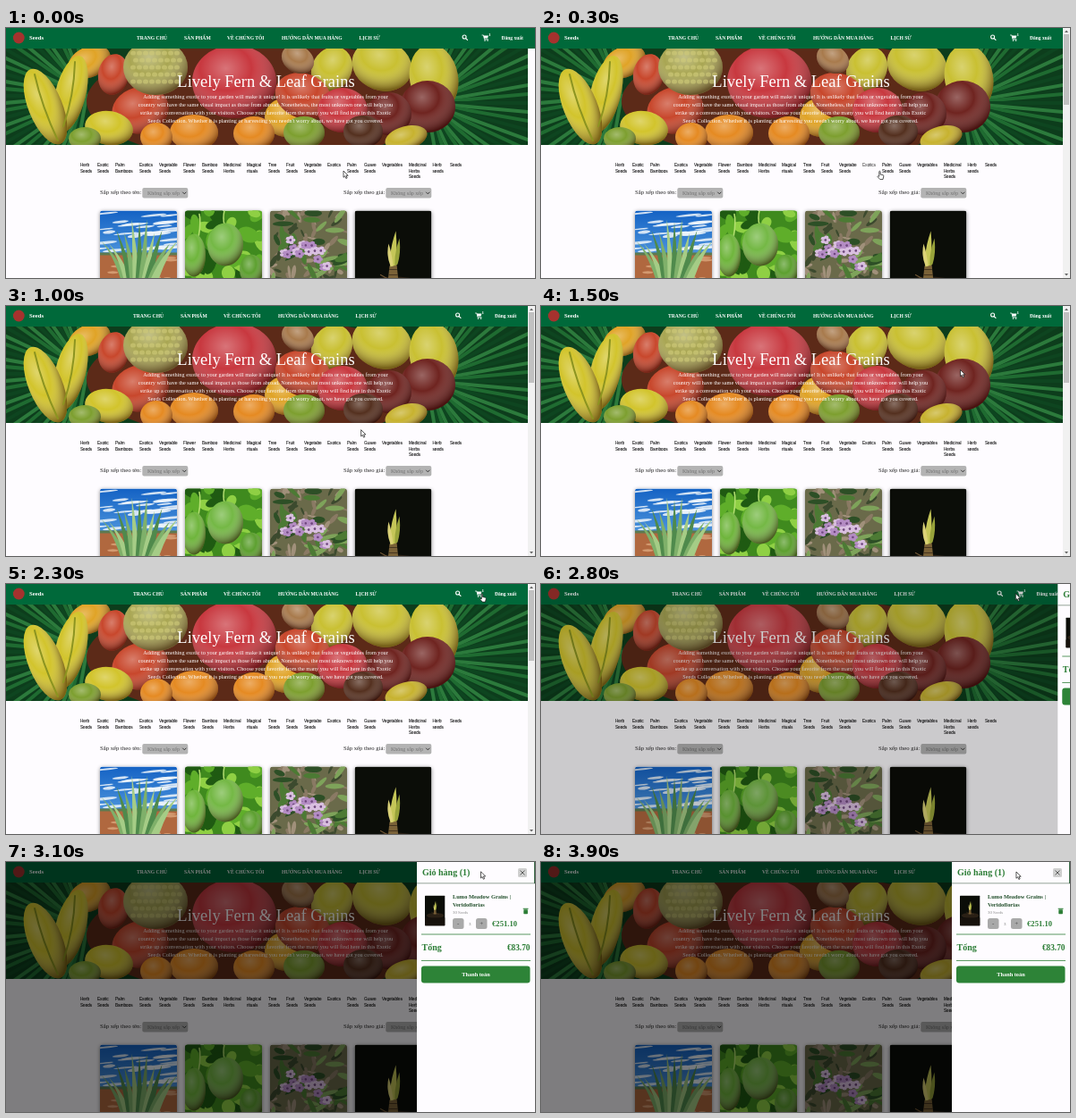
An HTML page for the animation above (4000 ms loop, 591x280 px).

```html
<!DOCTYPE html>
<html lang="vi">
<head>
<meta charset="utf-8">
<title>Seeds</title>
<style>
html, body { margin: 0; width: 100%; height: 100%; overflow: hidden; background: #fff; }
svg { display: block; width: 591px; height: 280px; }
text { font-family: "Liberation Serif", serif; white-space: pre; }
.sans { font-family: "Liberation Sans", Arial, sans-serif; stroke: currentColor; stroke-width: .1px; }
.bold { font-weight: bold; }
</style>
</head>
<body>
<svg id="stage" viewBox="0 0 591 280" xmlns="http://www.w3.org/2000/svg"></svg>
<script>
const LOOP = 4000, STEP = 100;
const GREEN = '#00693a', LEAF = '#2c7d36', PAGE = '#fefcff';

const rect = (x, y, w, h, fill, more = '') =>
  `<rect x="${x}" y="${y}" width="${w}" height="${h}" fill="${fill}" ${more}/>`;
const oval = (x, y, rx, ry, fill, turn = 0) =>
  `<ellipse cx="${x}" cy="${y}" rx="${rx}" ry="${ry}" fill="${fill}" transform="rotate(${turn} ${x} ${y})"/>`;
const path = (d, fill, more = '') => `<path d="${d}" fill="${fill}" ${more}/>`;
const line = (d, stroke, width = 1) =>
  path(d, 'none', `stroke="${stroke}" stroke-width="${width}" stroke-linecap="round"`);
const text = (x, y, size, str, fill = '#222', cls = '', more = '') =>
  `<text x="${x}" y="${y}" font-size="${size}" fill="${fill}" class="${cls}" ${more}>${str}</text>`;
const group = (id, body) => `<g id="${id}">${body}</g>`;
const middle = 'text-anchor="middle"';

let seed = 7;
const random = () => (seed = seed * 16807 % 2147483647) / 2147483647;
const between = (a, b) => a + (b - a) * random();
const repeat = (n, make) => Array.from({ length: n }, (_, i) => make(i)).join('');

const defs = `<defs>
  <radialGradient id="round" cx=".4" cy=".32" r=".68">
    <stop offset="0" stop-color="#fff" stop-opacity=".3"/>
    <stop offset=".45" stop-color="#fff" stop-opacity="0"/>
    <stop offset="1" stop-color="#200" stop-opacity=".5"/>
  </radialGradient>
  <linearGradient id="sky" x2="0" y2="1">
    <stop offset="0" stop-color="#1462c4"/><stop offset=".5" stop-color="#5fa4e4"/>
  </linearGradient>
  <filter id="shade" x="-10%" y="-10%" width="120%" height="120%">
    <feDropShadow dx="0" dy="1" stdDeviation="2" flood-opacity=".45"/>
  </filter>
  <clipPath id="hero"><rect y="23" width="583" height="108"/></clipPath>
  <clipPath id="frame"><rect width="86" height="130" rx="3"/></clipPath>
</defs>`;

// Palm leaflets fan out from a rib.
const palm = (x, y, side) => repeat(33, i => {
  const a = (-80 + i * 5) * Math.PI / 180;
  return line(`M${x} ${y}l${side * Math.cos(a) * 130} ${Math.sin(a) * 130}`,
    ['#1f6b31', '#0e4520', '#2c7a3c'][i % 3], 4);
});

// Back to front: colour, then centre, radii and turn of each fruit.
const fruits = [
  ['#c9c032', [[420, 42, 34, 28, 20], [478, 56, 27, 38, -10], [364, 46, 22, 26, 30]]],
  ['#e0a326', [[93, 38, 25, 17, -25], [313, 100, 24, 22, 0]]],
  ['#c8472c', [[120, 52, 17, 23, 10], [150, 92, 32, 26, -15], [332, 76, 32, 25, 20]]],
  ['#a9a653', [[167, 44, 36, 31, 0]]],
  ['#c8383f', [[255, 60, 47, 41, 0], [376, 92, 28, 25, 0]]],
  ['#a87a4c', [[326, 35, 19, 15, 30]]],
  ['#d2c42c', [[72, 74, 17, 44, 14], [44, 88, 19, 45, -22], [115, 112, 27, 19, 10]]],
  ['#6f2420', [[471, 88, 31, 29, 0], [428, 96, 25, 24, 0]]],
  ['#e58a22', [[210, 117, 27, 20, 0], [277, 118, 23, 19, 0], [168, 122, 18, 16, 0]]],
  ['#7d9f2f', [[333, 117, 23, 18, 0], [88, 124, 18, 13, 0]]],
  ['#54301f', [[399, 116, 22, 18, 0]]],
  ['#c7b22f', [[447, 123, 24, 13, -15]]],
];

const shaded = (x, y, rx, ry, fill, turn) =>
  oval(x, y, rx, ry, fill, turn) + oval(x, y, rx, ry, 'url(#round)', turn);

function hero() {
  const pile = fruits.map(([fill, spots]) =>
    spots.map(([x, y, rx, ry, turn]) => shaded(x, y, rx, ry, fill, turn)).join('')).join('');
  const scales = repeat(40, i => oval(142 + i % 8 * 7 + (i >> 3) % 2 * 3, 28 + (i >> 3) * 8, 3, 2.6, '#d0cb7a99'));
  const ridges = line('M32 52Q40 88 58 126M77 38Q76 76 64 110', '#8c9420', 2);
  const lines = [
    'Adding something exotic to your garden will make it unique! It is unlikely that fruits or vegetables from your',
    'country will have the same visual impact as those from abroad. Nonetheless, the most unknown one will help you',
    'strike up a conversation with your visitors. Choose your favorite from the many you will find here in this Exotic',
    "Seeds Collection. Whether it is planting or harvesting you needn't worry about, we have got you covered.",
  ];
  return `<g clip-path="url(#hero)">${rect(0, 23, 583, 108, '#0d3d1c')}
    ${palm(90, 76, -1)}${palm(470, 84, 1)}${oval(285, 82, 195, 68, '#5c2a18')}
    ${pile}${scales}${ridges}</g>
    ${text(290.5, 66, 18.5, 'Lively Fern &amp; Leaf Grains', '#fff', '', middle)}
    ${lines.map((s, i) => text(290, 79.2 + i * 8.8, 6.25, s, '#fff', '', middle)).join('')}`;
}

const magnifier = `<circle cx="504.6" cy="10" r="2" fill="none" stroke="#fff" stroke-width="1.1"/>` +
  line('M506.2 11.6l1.8 1.8', '#fff', 1.2);
const cart = line('M524.5 8h1.4l1.2 4.8h4', '#fff', .8) + path('M526 8.6h5.4l-.8 3h-4z', '#fff') +
  oval(527.5, 14, .8, .8, '#fff') + oval(530.6, 14, .8, .8, '#fff');

function header() {
  const nav = [[142, 'TRANG CHỦ'], [195, 'SẢN PHẨM'], [243, 'VỀ CHÚNG TÔI'],
    [304, 'HƯỚNG DẪN MUA HÀNG'], [390.5, 'LỊCH SỬ']];
  return rect(0, 0, 591, 23, GREEN) + oval(14.3, 11, 6.4, 6.4, '#a5322e') +
    text(26, 13.4, 6.7, 'Seeds', '#fff', 'bold') +
    group('nav', nav.map(([x, s]) => text(x, 13.2, 5.6, s, '#fff', 'bold')).join('')) +
    group('tools', magnifier + cart + text(531.6, 9.2, 5, '1', '#fff', 'bold') +
      text(546, 13.2, 5.5, 'Đăng xuất', '#fff', 'bold'));
}

const categories = [[83, 'Herb Seeds'], [102, 'Exotic Seeds'], [122, 'Palm Bamboos'],
  [149, 'Exotics Seeds'], [171, 'Vegetable Seeds'], [198, 'Flower Seeds'], [219, 'Bamboo Seeds'],
  [243, 'Medicinal Herbs'], [269, 'Magical rituals'], [293, 'Tree Seeds'], [313, 'Fruit Seeds'],
  [333, 'Vegetabe Seeds'], [359, 'Exotics'], [381, 'Palm Seeds'], [400, 'Guave Seeds'],
  [420, 'Vegetables'], [450, 'Medicinal Herbs Seeds'], [476.5, 'Herb seeds'], [496, 'Seeds']];

const menu = () => categories.map(([x, s]) => s.split(' ').map((word, i) =>
  text(x, 155 + i * 6.7, 4.65, word, '#222', 'sans', s === 'Exotics' ? 'id="hovered"' : '')
).join('')).join('');

const sorter = (x, label) => text(x, 186.3, 6.7, label) +
  rect(x + 47.3, 179, 51, 11.5, '#b3b3b3', 'rx="2"') +
  text(x + 53, 186.8, 6, 'Không sắp xếp', '#707070') +
  line(`M${x + 92.5} 184l1.8 1.8l1.8-1.8`, '#333', 1);

const aloe = () => rect(0, 0, 86, 130, 'url(#sky)') +
  repeat(34, () => oval(between(0, 86), between(3, 46), between(7, 18), between(.7, 2), '#eef5fbdd', -6)) +
  rect(0, 47, 86, 4, '#5d7a50') + rect(0, 50, 86, 80, '#b0683f') +
  repeat(16, () => oval(between(0, 86), between(52, 78), between(3, 9), 1.5, '#d39a70')) +
  repeat(11, i => {
    const off = i - 5, base = 44 + off * 2.5, tip = 44 + off * 8.5;
    const top = 4 + Math.abs(off) * 6 + i % 2 * 9;
    return path(`M${base - 5} 90Q${base + off * 2 - 3} 55 ${tip} ${top}Q${base + off * 2 + 4} 58 ${base + 5} 90z`,
      ['#7fb06a', '#a5cc86', '#4f8a4c'][i % 3]);
  });

const gourds = () => rect(0, 0, 86, 130, '#3f8a1e') +
  repeat(34, i => oval(between(0, 86), between(0, 80), between(6, 15), between(4, 9),
    ['#1f5a12', '#5fae2a', '#8fd044'][i % 3], between(0, 180))) +
  line('M44 0Q42 8 44 16M16 4Q18 14 15 30', '#b4e070', 1.5) +
  shaded(10, 50, 13, 24, '#6fb53c', 0) + shaded(74, 66, 13, 17, '#5da030', 0) +
  shaded(45, 38, 20, 24, '#74b845', 0);

const blossoms = () => rect(0, 0, 86, 130, '#6a6a4a') +
  repeat(50, i => oval(between(0, 86), between(0, 80), between(3, 8), between(1, 3),
    ['#a0907a', '#3c4a2e', '#8a7a64'][i % 3], between(0, 180))) +
  repeat(34, i => oval(between(0, 86), between(0, 80), between(6, 13), between(2, 4),
    ['#4c7a34', '#7ea35a', '#2d4f26'][i % 3], between(0, 180))) +
  repeat(15, n => {
    const x = 16 + n * 3.4, y = between(30, 52) + n * .9;
    return repeat(5, i => oval(x + 3 * Math.cos(i * 1.257), y + 3 * Math.sin(i * 1.257), 2.6, 2,
      n % 2 ? '#b48cc4' : '#d9bfe0')) + oval(x, y, 1.3, 1.3, '#704780');
  });

const shoot = () => rect(0, 0, 86, 130, '#0b0d08') + oval(44, 86, 37, 12, '#2a2015') +
  path('M37 80L39 62L47 60L49 80z', '#7a6238') + line('M39 66h8M38 72h10', '#46351f', 1) +
  path('M40 63Q38 46 46 23Q48 45 46 61z', '#c5c658') +
  path('M45 62Q44 48 50 31Q52 47 48 60z', '#98a33a') +
  path('M40 62Q35 50 38 37Q42 50 43 62z', '#dbd277') +
  line('M38 77L29 72M48 76L58 80', '#6e5433', 1.2);

const card = (x, art) => `<g transform="translate(${x} 204.5)"><g filter="url(#shade)">${
  rect(0, 0, 86, 130, '#fff', 'rx="3"')}</g><g clip-path="url(#frame)">${art()}</g></g>`;

const scrollbar = () => rect(583, 0, 8, 280, '#f1f1f1') + rect(584, 7, 6, 79, '#c1c1c1') +
  path('M585 5l2-2.5l2 2.5zM585 275l2 2.5l2-2.5z', '#666');

const amountButton = (x, sign) => rect(x, 63, 12.5, 12, '#a9a9a9', 'rx="2.5"') +
  text(x + 6.2, 71.2, 7, sign, '#444', '', middle);

function drawer() {
  const rule = y => rect(5, y, 122, 1, '#5b9a62');
  const bin = rect(119.3, 53.2, 4.6, 5, LEAF, 'rx=".6"') + rect(118.7, 51.8, 5.8, 1, LEAF);
  return rect(0, 0, 132, 280, PAGE) + rect(0, 23.4, 132, .9, '#899b8c') +
    rect(131, 0, 1, 24, '#386845') +
    text(6, 15, 10, 'Giỏ hàng (1)', LEAF, 'bold') +
    rect(113, 7, 10, 10, '#cfcfcf', 'rx="1.5"') + line('M115.8 9.8l4.4 4.4m0-4.4l-4.4 4.4', '#444', .8) +
    `<g transform="translate(9 37.5) scale(.262)"><g clip-path="url(#frame)">${shoot()}
      ${rect(0, 95, 86, 35, '#16110c')}</g></g>` +
    text(40, 41.3, 6.4, 'Lumo Meadow Grains |', '#23502c', 'bold') +
    text(40, 50, 6.4, 'Veridoflorias', '#23502c', 'bold') +
    text(40, 57.8, 4.8, '30 Seeds', '#888') + bin +
    amountButton(40, '-') + text(59.3, 71, 5, '3', '#777', '', middle) + amountButton(66, '+') +
    text(112, 72.3, 8.6, '€251.10', LEAF, 'bold', 'text-anchor="end"') + rule(80.5) +
    text(5.5, 99.3, 10, 'Tổng', LEAF, 'bold') +
    text(126.5, 99.2, 9.3, '€83.70', LEAF, 'bold', 'text-anchor="end"') + rule(110) +
    rect(5, 116.5, 121.5, 19, '#2d8337', 'rx="3"') +
    text(66, 128.3, 6.3, 'Thanh toán', '#fff', 'bold', middle);
}

const arrow = 'M0 0V7.3L1.7 5.8L2.9 8.5L4.2 7.9L3 5.3H5.2Z';
const hand = 'M1.3 .6Q2.1-.2 2.6 .8V4L5.7 4.7Q6.5 5 6.3 6L5.5 9.6H2.3L-.5 6.5Q-.3 5.2 1.3 6.2Z';
const outlined = d => path(d, '#fff', 'stroke="#111" stroke-width=".7" stroke-linejoin="round"');

document.getElementById('stage').innerHTML = defs + rect(0, 0, 591, 280, PAGE) + hero() + header() +
  menu() + sorter(105, 'Sắp xếp theo tên:') + sorter(377, 'Sắp xếp theo giá:') +
  card(105, aloe) + card(200, gourds) + card(295, blossoms) + card(389.5, shoot) +
  group('scrollbar', scrollbar()) + rect(0, 0, 591, 280, '#000', 'id="backdrop"') +
  group('drawer', drawer()) +
  group('pointer', group('arrow', outlined(arrow)) + group('hand', outlined(hand)));

const el = id => document.getElementById(id);
const move = (id, x, y = 0) => el(id).setAttribute('transform', `translate(${x} ${y})`);
const show = (id, on) => el(id).setAttribute('display', on ? 'inline' : 'none');
const clamp = v => Math.min(1, Math.max(0, v));
const ease = k => k * k * (3 - 2 * k);

// The pointer rests on the link, crosses the banner and settles on the cart.
const route = [[0, 377, 160], [600, 376, 160], [1200, 407, 128], [1800, 530, 15], [2300, 530, 10.5], [LOOP, 531, 11]];

function pointerAt(t) {
  const i = route.findIndex((p, n) => n && t <= p[0]);
  const [t0, x0, y0] = route[i - 1], [t1, x1, y1] = route[i];
  const k = (t - t0) / (t1 - t0);
  return [x0 + (x1 - x0) * k, y0 + (y1 - y0) * k];
}

const OPEN = 2740;

function draw(now) {
  const t = Math.floor(now % LOOP / STEP) * STEP;
  const wide = t < 100 || t > OPEN;
  const overLink = t >= 100 && t <= 600;
  const overCart = t >= 1800 && t < OPEN;
  const slid = ease(clamp((t - OPEN) / 300));

  move('nav', wide ? 4 : 0);
  move('tools', wide ? 7.5 : 0);
  show('scrollbar', !wide);
  el('hovered').setAttribute('fill', overLink ? '#888' : '#222');
  el('backdrop').setAttribute('opacity', clamp((t - OPEN) / 150) / 2);
  move('drawer', 591 - 132 * slid);
  show('drawer', slid > 0);
  move('pointer', ...pointerAt(t));
  show('hand', overLink || overCart);
  show('arrow', !overLink && !overCart);
}

function tick(now) {
  draw(now);
  requestAnimationFrame(tick);
}
draw(0);
requestAnimationFrame(tick);
</script>
</body>
</html>
```
